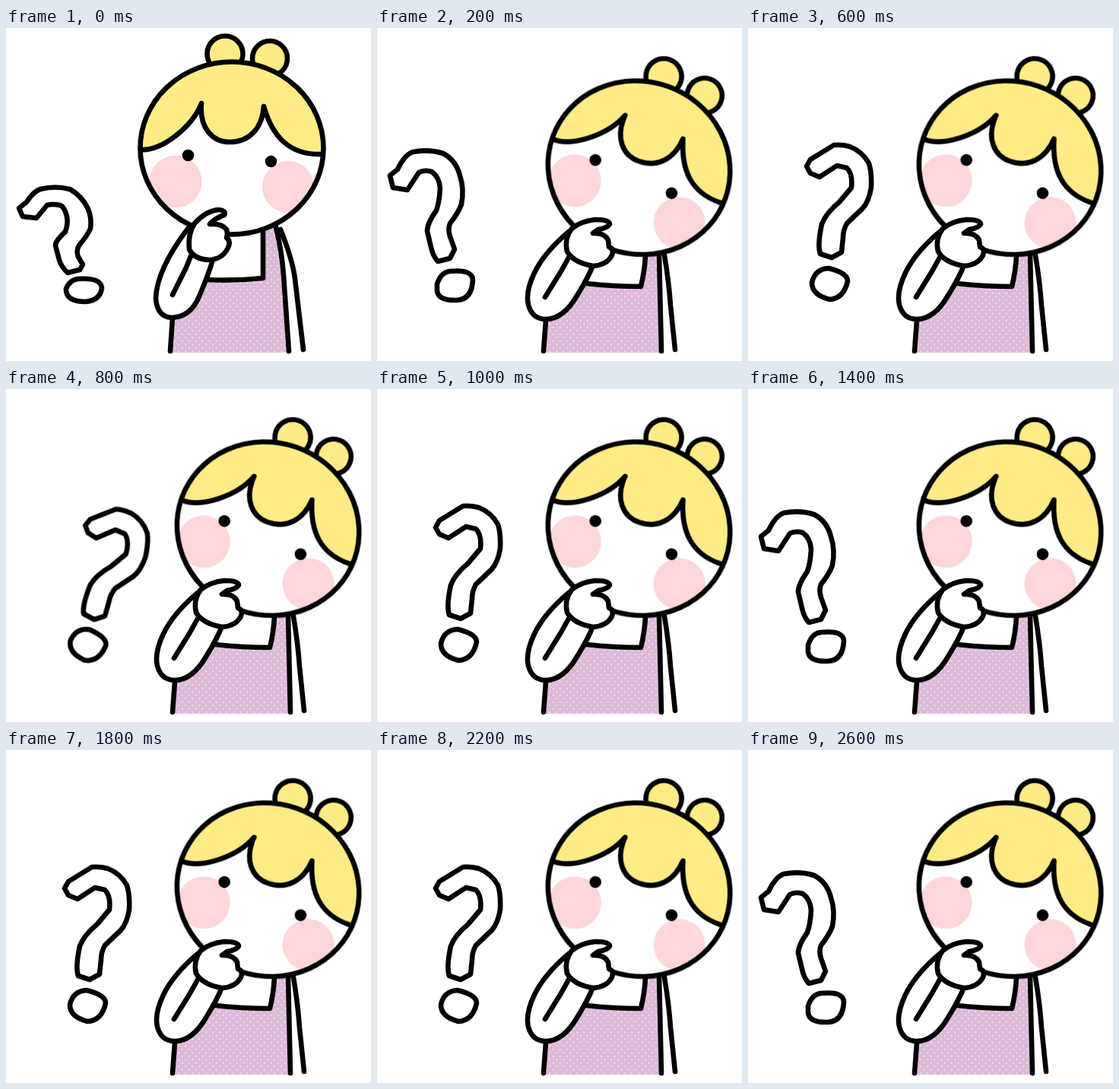
Write an HTML page without scripts that moves like this. It is 480 px wide and 438 px high and loops after 2800 ms.

```html
<!DOCTYPE html>
<html lang="en">
<head>
<meta charset="utf-8">
<title>Thinking</title>
<style>
  html, body { margin: 0; width: 100%; height: 100%; overflow: hidden; background: #fff; }
  svg { display: block; width: 480px; height: 438px; }

  .ink { stroke: #000; stroke-width: 6.6; stroke-linecap: round; stroke-linejoin: round; fill: none; }
  .white { fill: #fff; }
  .hair { fill: #ffec85; }
  .cheek { fill: #ffd6d9; }
  .apron { fill: url(#dots); stroke: none; }

  /* 14 hard steps of 200 ms */
  .upright, .leaning, .head, .mark-left, .mark-swing {
    animation: 2800ms step-end infinite;
  }
  .upright { animation-name: upright; }
  .leaning { animation-name: leaning; }
  .head { animation-name: tilt; transform-origin: 295.5px 188.8px; }
  .mark-left { animation-name: mark-left; }
  .mark-swing { animation-name: mark-swing; transform-origin: 106px 337px; }

  @keyframes upright { 0% { visibility: visible; } 7.14%, 100% { visibility: hidden; } }
  @keyframes leaning { 0% { visibility: hidden; } 7.14%, 100% { visibility: visible; } }
  @keyframes tilt {
    0% { transform: none; }
    7.14%, 100% { transform: translate(37.5px, 23.5px) rotate(19.3deg); }
  }
  @keyframes mark-left {
    0%, 14.28%, 57.14% { visibility: hidden; }
    7.14%, 50%, 92.85%, 100% { visibility: visible; }
  }
  @keyframes mark-swing {
    0%, 50%, 92.85%, 100% { visibility: hidden; transform: none; }
    14.28%, 42.85%, 57.14%, 85.71% { visibility: visible; transform: rotate(-11deg); }
    21.42%, 35.71%, 64.28%, 78.57% { visibility: visible; transform: none; }
    28.57%, 71.42% { visibility: visible; transform: rotate(10deg); }
  }
</style>
</head>
<body>
<svg viewBox="0 0 480 438">
  <defs>
    <pattern id="dots" width="9" height="9" patternUnits="userSpaceOnUse">
      <rect width="9" height="9" fill="#ddbad9"/>
      <g fill="#f6e9f5"><circle cx="2.250" cy="2.250" r="1"/><circle cx="6.750" cy="6.750" r="1"/></g>
    </pattern>
    <ellipse id="face" cx="297" cy="158" rx="120.500" ry="113.500"/>
    <clipPath id="inside"><use href="#face"/></clipPath>
  </defs>

  <g class="upright ink white">
    <path d="M17 237 L27 229 Q36 215 45 212 Q65 207 84 212 Q100 221 108 238 Q113 250 111 264 Q107 273 96 286 Q92 293 95 301 L101 311 L97 318 L81 322 Q72 313 70 305 L65 286 Q65 280 78 268 Q82 257 80 248 Q77 235 71 233 Q61 231 54 233 L40 250 L22 248 Z"/>
    <path d="M79 343 Q84 331 95 330 Q125 328 126 342 Q124 358 105 360 Q80 360 79 345 Z"/>
  </g>
  <g class="mark-left ink white">
    <path d="M17 194 L27 186 Q36 167 47 163 Q68 159 87 165 Q104 174 109 194 Q115 212 111 232 Q107 243 96 257 Q93 264 96 274 L102 291 L96 303 L80 307 Q73 299 71 288 L66 267 Q66 257 78 240 Q82 229 83 211 Q82 196 72 189 Q62 186 55 190 L40 213 L21 210 Z"/>
    <path d="M79 337 Q84 321 96 320 Q125 317 126 331 Q125 357 105 358 Q80 359 79 345 Z"/>
  </g>
  <g class="mark-swing ink white">
    <path d="M77 182 L82 173 L113 154 Q123 153 134 156 Q150 162 159 178 Q163 190 162 210 Q159 228 151 237 L130 257 Q125 266 125 276 L123 295 L110 302 L95 297 Q91 286 97 258 Q102 244 120 229 L136 210 Q138 192 130 184 L117 181 L94 196 L82 191 Z"/>
    <path d="M84 335 Q88 317 106 316 Q131 322 131 333 Q126 356 107 357 Q84 351 84 335 Z"/>
  </g>

  <g class="upright ink">
    <path class="apron" d="M219 380 L216 427 H372 L365 325 Q363 295 355 262 L338 266 V329 Q300 333 262 331 Z"/>
    <path d="M219 381 L216 425 M262 331 Q300 333 338 329 V268 M355 262 Q363 295 365 325 L372 425 M361 265 Q377 305 380 330 L391 423"/>
  </g>
  <g class="leaning ink">
    <path class="apron" d="M222 383 L219 427 H374 L371 298 H353 L347 340 L275 336 Z"/>
    <path d="M222 385 L219 425 M275 336 Q310 340 347 340 Q352 320 353 299 M371 298 L374 425 M378 299 Q384 335 386 365 L392 423"/>
  </g>

  <g class="head ink">
    <circle class="hair" cx="288" cy="34" r="23.5"/>
    <circle class="hair" cx="347" cy="40" r="23"/>
    <use href="#face" class="white" stroke="none"/>
    <g clip-path="url(#inside)">
      <g class="cheek" stroke="none">
        <circle cx="223" cy="202" r="34.5"/>
        <circle cx="371" cy="209" r="34"/>
      </g>
      <path class="hair" d="M165 160 V30 H430 V166 H417 C372 168 350 142 339 103 C337 132 320 150 294 150 C272 150 254 132 257 99 C245 130 205 162 177 160 Z"/>
    </g>
    <use href="#face"/>
    <g fill="#000" stroke="none">
      <circle cx="239.500" cy="167.500" r="7.8"/>
      <circle cx="348.500" cy="175.500" r="7.8"/>
    </g>
  </g>

  <g class="upright ink white">
    <path d="M239 264 Q198 318 197 356 Q199 380 218 381 Q243 380 254 353 Q268 320 272 304"/>
    <path d="M219 351 L237 315 L243 300"/>
    <path d="M241 291 Q239 270 248 257 Q262 241 279 239 Q290 240 287 246 Q275 250 268 258 Q284 257 290 265 Q292 271 290 276 Q296 280 292 289 Q285 304 267 305 Q247 304 241 291 Z"/>
  </g>
  <g class="leaning ink white">
    <path d="M252 268 Q220 295 207 322 Q195 347 199 364 Q204 383 222 383 Q245 383 263 352 Q278 328 284 312"/>
    <path d="M221 354 L242 320 L252 302"/>
    <path d="M250 294 Q246 277 256 264 Q268 254 287 252 Q306 252 306 258 Q303 263 291 265 L284 270 Q299 269 304 279 L305 288 Q312 290 309 299 Q302 312 284 313 Q259 309 250 294 Z"/>
  </g>
</svg>
</body>
</html>
```
